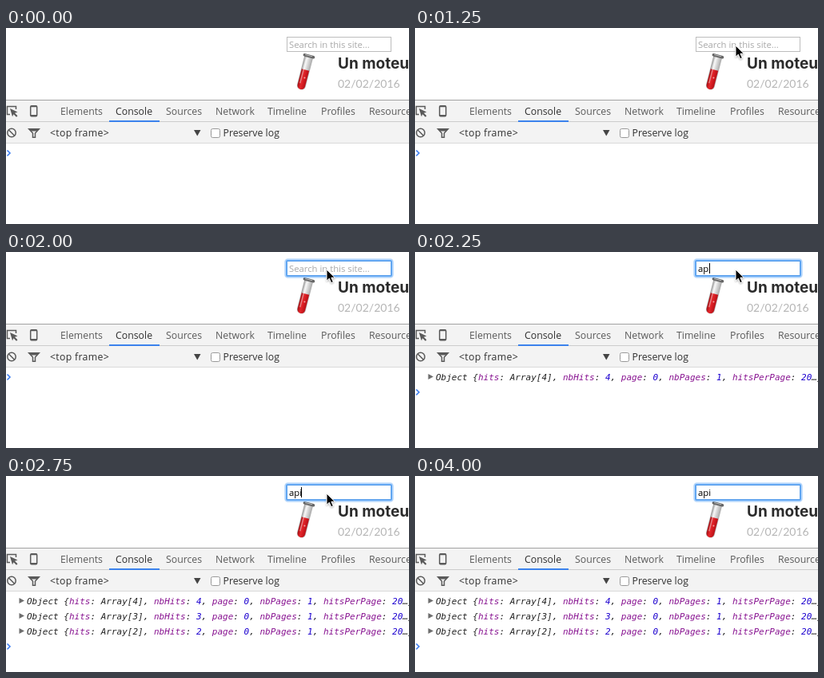
Animation of 504x246 px, one loop 4.25 s. Source, as an HTML page:

```html
<!DOCTYPE html>
<html lang="en">
<head>
<meta charset="utf-8">
<title>Search console</title>
<style>
  html, body { margin: 0; width: 100%; height: 100%; overflow: hidden; background: #fff; }
  svg { display: block; }
  text { white-space: pre; }
  .ui { font: 12.3px "Open Sans", sans-serif; fill: #303030; }
  .tab { fill: #5a5a5a; }
  .field { font: 11.3px "Open Sans", sans-serif; }
  .log { font: italic 11px "DejaVu Sans Mono", monospace; fill: #222; }
  .key { fill: #881391; }
  .num { fill: #1c00cf; }
  .icon { fill: none; stroke: #5a5a5a; stroke-width: 1.5; }
  .solid { fill: #5a5a5a; }
</style>
</head>
<body>
<svg width="504" height="246" viewBox="0 0 504 246">
  <defs>
    <linearGradient id="glass">
      <stop offset="0" stop-color="#999"/>
      <stop offset=".35" stop-color="#f4f4f4"/>
      <stop offset="1" stop-color="#aaa"/>
    </linearGradient>
    <linearGradient id="liquid">
      <stop offset="0" stop-color="#a80d12"/>
      <stop offset=".4" stop-color="#e5262b"/>
      <stop offset="1" stop-color="#b80f16"/>
    </linearGradient>
    <filter id="shadow" x="-50%" y="-50%" width="200%" height="200%">
      <feDropShadow dx="0" dy="1" stdDeviation=".8" flood-opacity=".35"/>
    </filter>
  </defs>

  <!-- Page -->
  <g transform="translate(379 35) rotate(14.5)">
    <path d="M-5.5 0V38.500a5.500 5.500 0 0 0 11 0V0z" fill="url(#glass)"/>
    <path d="M-4.800 18H4.800V38.500a4.800 4.800 0 0 1-9.600 0z" fill="url(#liquid)"/>
    <path d="M-2.300 4V36" stroke="#fff" stroke-opacity=".45" stroke-width="1.500"/>
    <circle cx="1.500" cy="28" r="1" fill="#f6a5a5"/>
    <rect x="-7.500" y="-1.500" width="15" height="3.500" rx="1.700" fill="#666"/>
    <path d="M-5 -.3H4" stroke="#bbb"/>
  </g>
  <text x="415" y="51" style="font:700 19px Inter,sans-serif" fill="#2b2b2b">Un moteur de recherche</text>
  <text x="415" y="75" style="font:14px Lato,sans-serif" fill="#b5b5b5">02/02/2016</text>

  <rect x="351.500" y="11.500" width="130" height="18" fill="#fff" stroke="#bdbdbd"/>
  <g id="ring" fill="none" stroke="#4a9bf5">
    <rect x="350" y="10" width="133" height="21" rx="2.500" stroke-width="3.500" opacity=".4"/>
    <rect x="351" y="11" width="131" height="19" rx="1" stroke-width="2" opacity=".75"/>
  </g>
  <text id="query" class="field" x="354" y="25"></text>
  <rect id="caret" y="14" width="1" height="13"/>

  <!-- Developer tools -->
  <rect y="91" width="504" height="53" fill="#f3f3f3"/>
  <path d="M0 90.500H504" stroke="#a3a3a3"/>
  <path d="M0 117.500H504" stroke="#ccc"/>
  <path d="M0 144.500H504" stroke="#dadada"/>
  <rect x="129" y="116" width="63" height="2" fill="#3b82ec"/>
  <g id="tabs"></g>

  <path class="icon" d="M5 108.500H1.500V98.500H12.500V102"/>
  <path class="solid" d="M5 101L14.500 105.500 11 106.700 14.500 110.300 13 111.700 9.500 108.200 8 111.300z"/>
  <rect class="icon" x="30.700" y="97.700" width="8" height="13" rx="1.300"/>
  <path class="icon" d="M31 98.500H38.500M31 109.700H38.500"/>
  <circle class="icon" cx="7" cy="131.500" r="5.200"/>
  <path class="icon" d="M3.500 128L10.500 135"/>
  <path class="icon" d="M28.700 126.800H41.300L36.500 132V137.300H33.500V132z"/>
  <path class="solid" d="M29 126.500H41L38.500 129.500H31.500z"/>
  <text class="ui" x="55" y="136" letter-spacing=".3">&lt;top frame&gt;</text>
  <path d="M235 128H243.500L239.250 135.500z" fill="#444"/>
  <rect x="256.500" y="126.500" width="11" height="11" rx="2" fill="#fff" stroke="#999"/>
  <text class="ui" x="271.500" y="136">Preserve log</text>

  <g id="logs"></g>
  <path id="prompt" d="M1.500 -3.500L5 0L1.500 3.500" fill="none" stroke="#3b7df0" stroke-width="1.600"/>

  <path id="pointer" filter="url(#shadow)" stroke="#fff" stroke-width="1" stroke-linejoin="round"
    d="M0 0V14.300L3.300 11.200 5.700 16.700 8.300 15.600 5.900 10.200H10.400z"/>
</svg>
<script>
const $ = id => document.getElementById(id);
const LOOP = 4250, ROW = 19, FIRST_ROW = 157;

const tabs = [["Elements", 68], ["Console", 137], ["Sources", 200], ["Network", 262],
  ["Timeline", 327], ["Profiles", 394], ["Resources", 454]];
$("tabs").innerHTML = tabs.map(([name, x]) =>
  `<text class="ui ${name === "Console" ? "" : "tab"}" x="${x}" y="109">${name}</text>`).join("");

const key = name => `<tspan class="key">${name}</tspan>: `;
const pair = (name, value) => `${key(name)}<tspan class="num">${value}</tspan>`;

function logRow(hits, row) {
  const y = FIRST_ROW + row * ROW;
  const fields = [key("hits") + `Array[${hits}]`, pair("nbHits", hits), pair("page", 0),
    pair("nbPages", 1), pair("hitsPerPage", 20)];
  return `<g><path d="M16.500 ${y - 4}L23 ${y - .5}L16.500 ${y + 3}z" fill="#6e6e6e"/>
    <text class="log" x="26" y="${y + 4}">Object {${fields.join(", ")}…}</text></g>`;
}
$("logs").innerHTML = [4, 3, 2].map(logRow).join("");

// Latest entry of a [start, value] schedule
const at = (t, steps) => steps.filter(([start]) => t >= start).pop()[1];
const show = (node, on) => node.setAttribute("visibility", on ? "visible" : "hidden");

const pointerSteps = [[0, null], [500, [429, 11]], [750, [420, 22]], [1250, [401, 22]], [3000, null]];
const querySteps = [[0, ""], [2250, "ap"], [2500, "api"]];
const caretSteps = [[0, 0], [1500, 354], [2000, 0], [2250, 368], [2500, 369],
  [3000, 0], [3500, 369], [4000, 0]];
const countSteps = [[0, 0], [2250, 1], [2500, 2], [2750, 3]];

function draw(now) {
  const t = now % LOOP;
  const pointer = at(t, pointerSteps), query = at(t, querySteps);
  const caret = at(t, caretSteps), count = at(t, countSteps);

  show($("pointer"), pointer);
  if (pointer) $("pointer").setAttribute("transform", `translate(${pointer})`);
  show($("ring"), t >= 1500);
  $("query").textContent = query || "Search in this site...";
  $("query").setAttribute("fill", query ? "#000" : "#a9a9a9");
  show($("caret"), caret);
  $("caret").setAttribute("x", caret);
  [...$("logs").children].forEach((row, i) => show(row, i < count));
  $("prompt").setAttribute("transform", `translate(0 ${FIRST_ROW + count * ROW})`);
  requestAnimationFrame(draw);
}
draw(performance.now());
</script>
</body>
</html>
```
